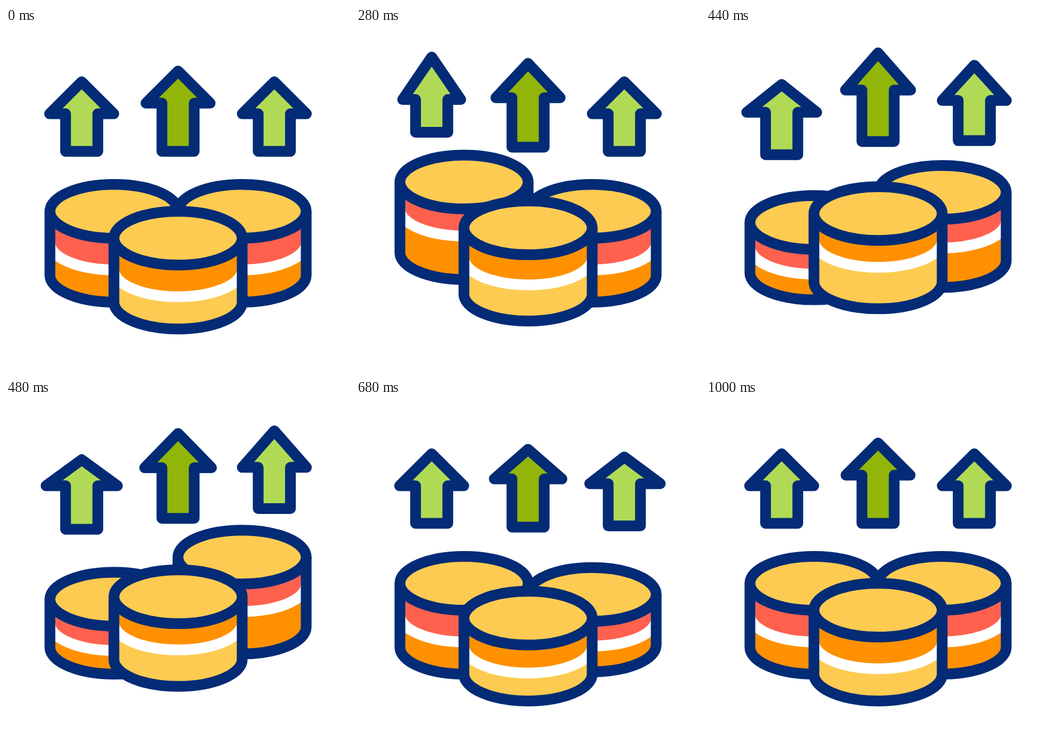
These frames come from a looping animation (640x640 px, 1.48 s). An HTML page:

```html
<!DOCTYPE html>
<html lang="en">
<head>
<meta charset="utf-8">
<title>Rising coins</title>
<style>
  html, body { margin: 0; width: 100%; height: 100%; overflow: hidden; background: #fff; }
  svg { display: block; width: 100%; height: 100%; }
  .line { stroke: #032b76; stroke-width: 20; stroke-linejoin: round; }
  .band { stroke: #fff; stroke-width: 20; fill: none; }
</style>
</head>
<body>
<svg id="stage" viewBox="0 0 640 640"></svg>
<script>
const LOOP = 1480, STEP = 40;
const KEYS = [80, 280, 480, 640]; // rest, peak, dip, rest
const RX = 119.3, RY = 50;
const GOLD = '#fdcb51', ORANGE = '#ff9100', PINK = '#ff614f';
const LIME = '#b0da55', GREEN = '#91b508';
const stage = document.getElementById('stage');

function add(tag, cls, fill) {
  const el = document.createElementNS('http://www.w3.org/2000/svg', tag);
  if (cls) el.setAttribute('class', cls);
  if (fill) el.setAttribute('fill', fill);
  return stage.appendChild(el);
}

const smooth = p => p * p * (3 - 2 * p);

// Offset at time t, going 0 -> peak -> dip -> 0.
function offset(t, [peak, dip]) {
  const values = [0, peak, dip, 0];
  if (t <= KEYS[0] || t >= KEYS[3]) return 0;
  const i = t < KEYS[1] ? 0 : t < KEYS[2] ? 1 : 2;
  const p = (t - KEYS[i]) / (KEYS[i + 1] - KEYS[i]);
  return values[i] + (values[i + 1] - values[i]) * smooth(p);
}

function makeCoin(x, y, delay, upper, lower) {
  const left = x - RX, right = x + RX;
  const base = add('path', '', lower);
  const top = add('path', '', upper);
  const band = add('path', 'band');
  const side = add('path', 'line', 'none');
  const lid = add('ellipse', 'line', GOLD);
  lid.setAttribute('cx', x);
  lid.setAttribute('rx', RX);
  lid.setAttribute('ry', RY);
  const arc = level => `${left} ${level}A${RX} ${RY} 0 0 0 ${right} ${level}`;

  return time => {
    const t = time - delay;
    const lidY = y + offset(t, [-54.5, 29.5]);
    const bandY = y + 59 + offset(t, [-63, 16]);
    const baseY = y + 119 + offset(t, [-42, 0]);
    const body = `M${left} ${lidY}L${arc(baseY)}V${lidY}`;
    base.setAttribute('d', body);
    side.setAttribute('d', body);
    top.setAttribute('d', `M${left} ${lidY}L${arc(bandY)}V${lidY}Z`);
    band.setAttribute('d', 'M' + arc(bandY));
    lid.setAttribute('cy', lidY);
  };
}

function makeArrow(x, rest, delay, fill, move) {
  const path = add('path', 'line', fill);
  return time => {
    const at = key => offset(time - delay, move[key]);
    const tip = rest.tip + at('tip');
    const neck = rest.neck + at('neck');
    const foot = 229.5 + at('foot');
    const wingL = x - 59.7 - at('wingL');
    const wingR = x + 59.7 + at('wingR');
    path.setAttribute('d',
      `M${x} ${tip}L${wingR} ${neck}H${x + 30}V${foot}H${x - 30}V${neck}H${wingL}Z`);
  };
}

const low = { tip: 100, neck: 159.6 }, high = { tip: 80, neck: 139.8 };

const parts = [
  makeCoin(201, 341, 0, PINK, ORANGE),
  makeCoin(439.2, 341, 240, PINK, ORANGE),
  makeCoin(320.1, 391, 120, ORANGE, GOLD),
  makeArrow(140.8, low, 0, LIME, {
    tip: [-46, 11], neck: [-26.5, 0], foot: [-35.5, 11],
    wingL: [-5.7, 6.6], wingR: [-5.7, 6.8]
  }),
  makeArrow(320.1, high, 120, GREEN, {
    tip: [-40.3, 23.5], neck: [-28.8, 14], foot: [-22, 14],
    wingL: [0.3, 6.3], wingR: [0.2, 6.7]
  }),
  makeArrow(499.2, low, 240, LIME, {
    tip: [-47.5, 12.2], neck: [-38.2, 0], foot: [-30.7, 8.8],
    wingL: [0, 5.2], wingR: [0, 8]
  })
];

const start = performance.now();

function draw(now) {
  const t = Math.max(0, now - start) % LOOP;
  const time = Math.floor(t / STEP) * STEP;
  parts.forEach(part => part(time));
  requestAnimationFrame(draw);
}
draw(start);
</script>
</body>
</html>
```
